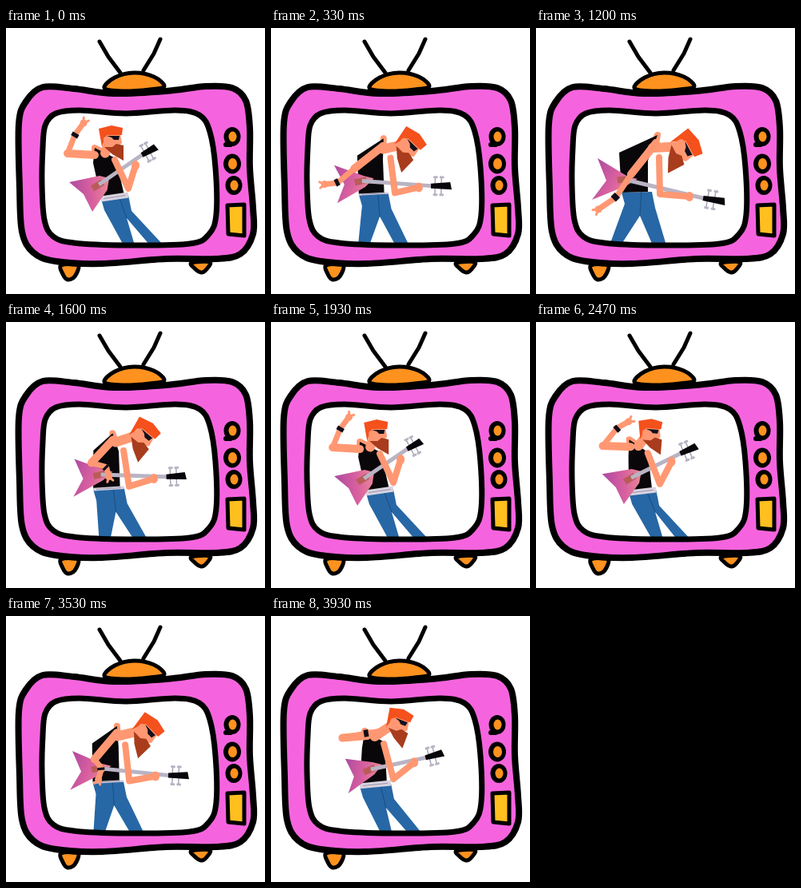
Recreate the animation shown at these times as an HTML page with a canvas. Size 324 by 333 pixels, loop 3.99 s.

```html
<!DOCTYPE html>
<html lang="en">
<head>
<meta charset="utf-8">
<title>Guitarist on TV</title>
<style>
html, body { margin: 0; width: 100%; height: 100%; overflow: hidden; background: #fff; }
canvas { display: block; }
</style>
</head>
<body>
<canvas id="tv" width="324" height="333"></canvas>
<script>
const ctx = document.getElementById('tv').getContext('2d');
const LOOP = 3990, BEAT = 478, STEP = 200 / 3;
const SKIN = '#ff9872', HAIR = '#f4511c', BEARD = '#a83c1c', PINK = '#f564de',
      ORANGE = '#ff921e', BLUE = '#2767a5', INK = '#000';

// Each pose: joints of the player and corners of the guitar.
// head holds x, y, angle in degrees and size.
const up = {
  head: [131, 137, 0, 1], sh: [111, 159], el: [77, 157], wr: [86, 134], ha: [97, 119],
  sh2: [136, 165], el2: [153, 201], ha2: [162, 172],
  back: [109, 169], top: [111, 150], chest: [137, 163],
  hipL: [119, 214], hipR: [153, 209], fork: [151, 238], footL: [154, 272], footR: [188, 272],
  tipA: [79, 193], notch: [97, 208], tipB: [108, 230], join: [129, 188],
  nut: [170, 159], end: [189, 149], belt: [7]
};
const lean = {
  head: [143, 136, 5, 1], sh: [119, 156], el: [84, 155], wr: [102, 133], ha: [117, 125],
  sh2: [140, 164], el2: [155, 203], ha2: [170, 175],
  back: [116, 168], top: [117, 147], chest: [140, 163],
  hipL: [116, 214], hipR: [150, 210], fork: [149, 238], footL: [152, 272], footR: [184, 272],
  tipA: [83, 190], notch: [100, 207], tipB: [110, 228], join: [132, 187],
  nut: [181, 165], end: [203, 156], belt: [7]
};
const fold = {
  head: [159, 131, 20, 1.05], sh: [120, 150], el: [89, 152], wr: [119, 146], ha: [137, 143],
  sh2: [141, 160], el2: [153, 204], ha2: [179, 183],
  back: [114, 165], top: [117, 144], chest: [142, 158],
  hipL: [111, 213], hipR: [150, 209], fork: [144, 240], footL: [145, 272], footR: [180, 272],
  tipA: [93, 179], notch: [104, 201], tipB: [97, 222], join: [139, 186],
  nut: [193, 177], end: [216, 171], belt: [7]
};
const bent = {
  head: [187, 148, 62, 1.22], sh: [150, 144], el: [119, 183], wr: [100, 212], ha: [78, 227],
  sh2: [154, 162], el2: [155, 208], ha2: [192, 211],
  back: [104, 156], top: [152, 134], chest: [140, 166],
  hipL: [107, 206], hipR: [145, 205], fork: [130, 235], footL: [99, 272], footR: [154, 272],
  tipA: [77, 163], notch: [88, 191], tipB: [70, 215], join: [127, 189],
  nut: [209, 213], end: [237, 218], belt: [0]
};

const lerp = (a, b, k) => a.map((v, i) => v + (b[i] - v) * k);
function mix(a, b, k) {
  const p = {};
  for (const key in a) p[key] = lerp(a[key], b[key], k);
  return p;
}

const strum = { ...mix(fold, bent, .5), el: [108, 178], wr: [126, 184], ha: [128, 197] };
const rise = { ...mix(bent, lean, .5), el: [96, 172], wr: [73, 184], ha: [61, 178] };
const keys = [[0, up], [20, up], [80, lean], [108, fold], [170, strum],
              [240, bent], [268, bent], [370, rise], [BEAT, up]];

function poseAt(t) {
  const i = keys.findIndex(k => k[0] > t);
  const [t0, a] = keys[i - 1], [t1, b] = keys[i];
  return mix(a, b, (t - t0) / (t1 - t0));
}

function poly(pts, fill) {
  ctx.beginPath();
  pts.forEach(p => ctx.lineTo(p[0], p[1]));
  ctx.closePath();
  ctx.fillStyle = fill;
  ctx.fill();
}
function line(pts, width, color, cap = 'round') {
  ctx.beginPath();
  pts.forEach(p => ctx.lineTo(p[0], p[1]));
  ctx.lineWidth = width;
  ctx.lineCap = cap;
  ctx.lineJoin = 'round';
  ctx.strokeStyle = color;
  ctx.stroke();
}
function dot(x, y, rx, ry, fill) {
  ctx.beginPath();
  ctx.ellipse(x, y, rx, ry, 0, 0, Math.PI * 2);
  ctx.fillStyle = fill;
  ctx.fill();
}

// Closed smooth curve through the given points.
function blob(pts) {
  const path = new Path2D(), n = pts.length, at = i => pts[(i + n) % n];
  path.moveTo(...pts[0]);
  for (let i = 0; i < n; i++) {
    const a = at(i - 1), b = at(i), c = at(i + 1), d = at(i + 2);
    path.bezierCurveTo(b[0] + (c[0] - a[0]) / 6, b[1] + (c[1] - a[1]) / 6,
      c[0] - (d[0] - b[0]) / 6, c[1] - (d[1] - b[1]) / 6, c[0], c[1]);
  }
  path.closePath();
  return path;
}
function outline(path, fill, width) {
  if (fill) { ctx.fillStyle = fill; ctx.fill(path); }
  ctx.lineWidth = width;
  ctx.lineJoin = 'round';
  ctx.strokeStyle = INK;
  ctx.stroke(path);
}

const shell = blob([[46, 74], [85, 76], [135, 82], [200, 79], [250, 73], [283, 75], [300, 91],
  [305, 125], [305, 175], [309, 225], [309, 258], [293, 283], [262, 289], [200, 289], [120, 295],
  [62, 292], [34, 281], [20, 255], [17, 200], [16, 120], [25, 92]]);
const screen = blob([[46, 150], [49, 122], [62, 107], [92, 103], [150, 107], [212, 103], [242, 109],
  [255, 130], [262, 175], [263, 233], [254, 258], [230, 270], [150, 272], [85, 269], [59, 261],
  [48, 240], [45, 195]]);
const dome = blob([[123, 75], [136, 62], [160, 56], [185, 61], [198, 73], [180, 77], [145, 79]]);
const footA = blob([[69, 297], [90, 297], [86, 311], [77, 315], [71, 308]]);
const footB = blob([[232, 294], [255, 293], [250, 303], [244, 306], [236, 301]]);

function drawHead([x, y, deg, size]) {
  ctx.save();
  ctx.translate(x, y);
  ctx.rotate(deg * Math.PI / 180);
  ctx.scale(size, size);
  poly([[-11, -4], [12, -4], [14, 7], [5, 14], [-8, 16]], SKIN);
  poly([[-8, 12], [2, 12], [7, 8], [16, 10], [16, 29], [2, 21]], BEARD);
  poly([[-15, -11], [1, -15], [15, -12], [14, -3], [-5, -3], [-8, 3], [-11, 12]], HAIR);
  dot(-6, 3, 3, 4, SKIN);
  poly([[-5, -2], [11, -2], [10, 3], [4, 3], [1, 0]], '#14101c');
  ctx.restore();
}

function drawGuitar(p) {
  const g = ctx.createLinearGradient(...p.tipA, ...p.join);
  g.addColorStop(0, '#ad4aa0');
  g.addColorStop(.55, '#d9609f');
  g.addColorStop(1, '#e88a96');
  const [jx, jy] = p.join;
  const low = lerp(p.join, p.tipB, .35);
  poly([p.tipA, [jx - 12, jy - 3], p.join, [low[0] + 5, low[1]], p.tipB, p.notch], g);
  line([lerp(p.notch, p.join, .35), lerp(p.notch, p.join, .75)], 8, '#b95c58', 'butt');
  line([lerp(p.notch, p.join, .6), p.nut], 5, '#b9b3c3', 'butt');

  const dx = p.end[0] - p.nut[0], dy = p.end[1] - p.nut[1];
  const len = Math.hypot(dx, dy), ux = dx / len, uy = dy / len;
  const at = (u, v) => [p.nut[0] + ux * u - uy * v, p.nut[1] + uy * u + ux * v];
  for (const u of [.2, .5]) {
    line([at(len * u, -10), at(len * u, 10)], 1.5, '#aaa4b6');
    for (const v of [-11, 11]) line([at(len * u - 1, v), at(len * u + 2, v)], 3, '#b9b3c3');
  }
  poly([at(0, -3), at(len - 2, -5), at(len, 4), at(0, 3)], '#08060a');
}

function drawHand(wr, ha) {
  const a = Math.atan2(ha[1] - wr[1], ha[0] - wr[0]);
  dot(ha[0], ha[1], 4.5, 4.5, SKIN);
  for (const d of [-.6, .5])
    line([ha, [ha[0] + 7 * Math.cos(a + d), ha[1] + 7 * Math.sin(a + d)]], 3, SKIN);
}

function drawPlayer(p) {
  const [lx, ly] = p.hipL, [rx, ry] = p.hipR;
  poly([[lx, ly], [rx, ry], [rx + 4, ry + 20], [p.footR[0] + 9, 272], [p.footR[0] - 8, 272],
    p.fork, [p.footL[0] + 7, 272], [p.footL[0] - 7, 272], [lx + 4, ly + 14]], BLUE);
  line([p.fork, lerp(p.hipL, p.hipR, .65)], 1, '#1c4c80');

  const collar = lerp(p.top, p.chest, .5);
  line([p.sh, p.top, collar], 8, SKIN);
  poly([p.hipL, p.back, p.top, collar, p.chest, [rx - 5, ry]], '#09070a');
  if (p.belt[0] > 1) {
    line([p.hipL, p.hipR], p.belt[0], '#d8d3df', 'butt');
    line([lerp(p.hipL, p.hipR, .1), lerp(p.hipL, p.hipR, .9)], 1, '#9b93ad', 'butt');
  }
  line([collar, lerp(collar, p.head, .75)], 12, SKIN);
  drawHead(p.head);
  drawGuitar(p);

  line([p.sh2, p.el2, p.ha2], 8, SKIN);
  dot(p.ha2[0], p.ha2[1], 5, 6, SKIN);

  line([p.sh, p.el], 10, SKIN);
  line([p.el, p.wr, p.ha], 7, SKIN);
  line([lerp(p.wr, p.el, .1), lerp(p.wr, p.ha, .15)], 9, '#120c18', 'butt');
  drawHand(p.wr, p.ha);
}

function drawKnob(x, y, r) {
  dot(x, y, r, r + 1.5, INK);
  dot(x + .5, y, r - 5.5, r - 4, ORANGE);
}

function drawSet(pose) {
  ctx.fillStyle = '#fff';
  ctx.fillRect(0, 0, 324, 333);
  line([[117, 17], [128, 36], [143, 56]], 5, INK);
  line([[193, 14], [185, 32], [172, 53]], 5, INK);
  outline(footA, ORANGE, 5);
  outline(footB, ORANGE, 5);
  outline(dome, ORANGE, 5);
  outline(shell, PINK, 8);

  ctx.fillStyle = '#fff';
  ctx.fill(screen);
  ctx.save();
  ctx.clip(screen);
  drawPlayer(pose);
  ctx.restore();
  outline(screen, null, 7);

  line([[275, 146], [281, 146]], 6, INK);
  drawKnob(283, 136, 10.5);
  drawKnob(283, 170, 11);
  drawKnob(285, 197, 10.5);
  poly([[277, 222], [298, 221], [298, 260], [278, 258]], '#ffbf1f');
  line([[277, 222], [298, 221], [298, 260], [278, 258], [277, 222]], 5, INK);
}

function frame(now) {
  const t = now % LOOP;
  // The picture holds fifteen steps a second, timed to hundredths.
  const n = Math.min(59, Math.floor((t + 5) / STEP));
  drawSet(poseAt(n * STEP % BEAT));
  requestAnimationFrame(frame);
}
frame(performance.now());
</script>
</body>
</html>
```
